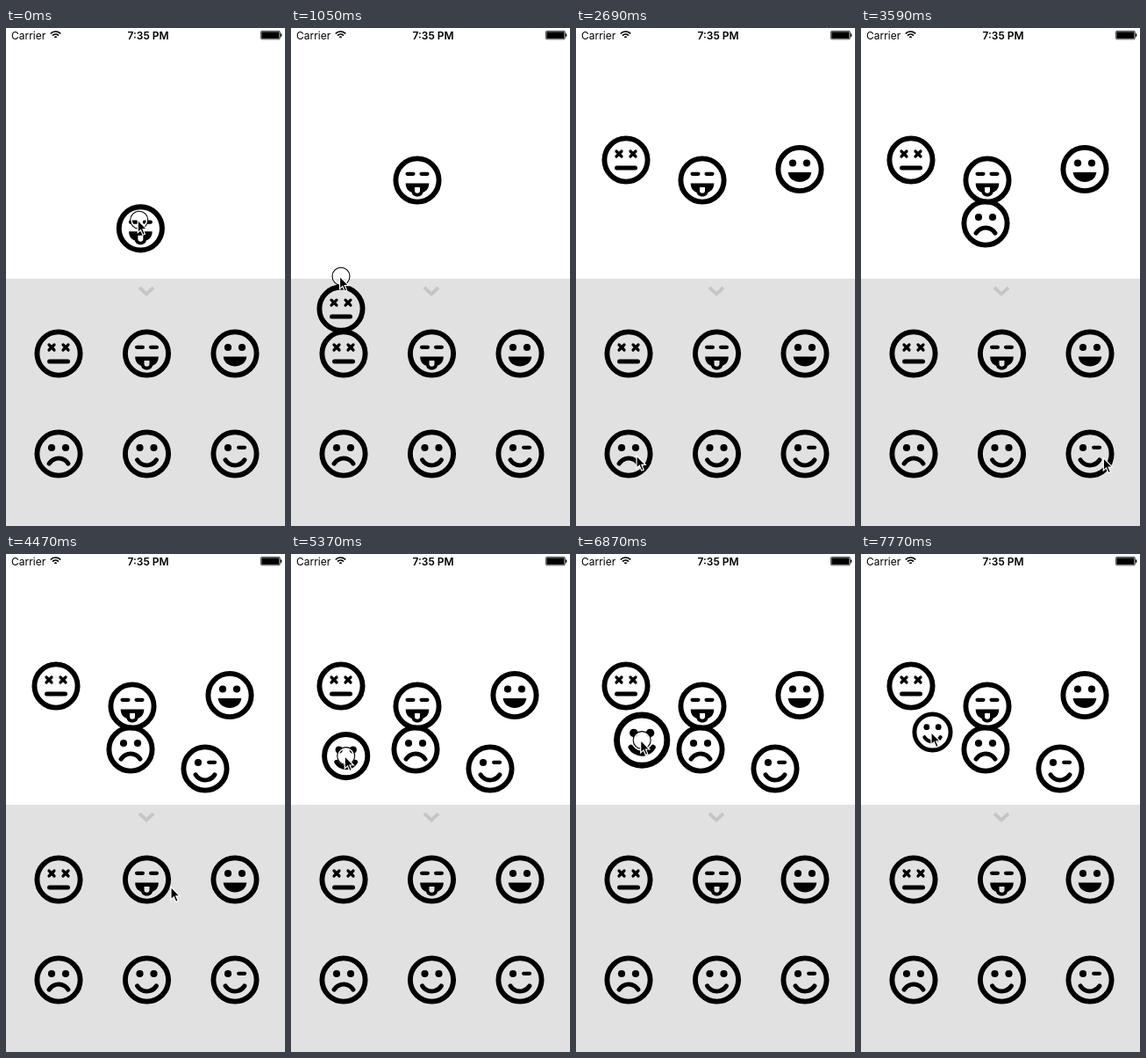
Recreate the animation shown at these times as an HTML page with a canvas. Size 318 px wide and 566 px high, loop 8000 ms.

```html
<!DOCTYPE html>
<html lang="en">
<head>
<meta charset="utf-8">
<title>Sticker tray</title>
<style>
html, body { margin: 0; width: 100%; height: 100%; overflow: hidden; background: #fff; }
canvas { display: block; width: 318px; height: 566px; }
</style>
</head>
<body>
<canvas id="stage"></canvas>
<script>
const W = 318, H = 566, LOOP = 8000, LAG = 60;
const canvas = document.getElementById('stage');
const ctx = canvas.getContext('2d');
const dpr = window.devicePixelRatio || 1;
canvas.width = W * dpr;
canvas.height = H * dpr;

// Each sticker is grabbed in the tray, pulled to its drop point, and left there.
const drags = [
  { name: 'tongue', grab: [178, 372], drop: [144, 173], start: -1140, end: 510 },
  { name: 'dead', grab: [57, 370], drop: [57, 150], start: 834, end: 1334 },
  { name: 'grin', grab: [261, 370], drop: [255, 160.5], start: 1750, end: 2100 },
  { name: 'sad', grab: [70.5, 486], drop: [142, 222], start: 2790, end: 3140 },
  { name: 'wink', grab: [278, 489], drop: [227, 244], start: 3700, end: 4200 },
  { name: 'smile', grab: [160, 484], drop: [62.7, 229.6], start: 4800, end: 5300 }
];
// The last sticker is held, grows while it moves, and shrinks on release.
const pinch = { press: 6270, start: 6595, grow: 6700, end: 7045, release: 7700, to: [81.5, 202.5] };

function ease(t, start, end) {
  const u = Math.min(1, Math.max(0, (t - start) / (end - start)));
  return u * u * (3 - 2 * u);
}

const mix = (a, b, p) => a.map((v, i) => v + (b[i] - v) * p);
const dragPoint = (d, t) => mix(d.grab, d.drop, ease(t, d.start, d.end));
const pinchPoint = t => mix(drags[5].drop, pinch.to, ease(t, pinch.start, pinch.end));

function pointerPoint(t) {
  const i = drags.findLastIndex(d => t >= d.start);
  const d = drags[i], next = drags[i + 1];
  if (t < d.end) return dragPoint(d, t);
  return next ? mix(d.drop, next.grab, ease(t, d.end, next.start - 100)) : pinchPoint(t);
}

const isPressed = t => drags.some(d => t >= d.start && t < d.end + 100) ||
  (t >= pinch.press && t < pinch.release);

function dot(x, y, r) {
  ctx.beginPath();
  ctx.arc(x, y, r, 0, Math.PI * 2);
  ctx.fill();
}

function line(width, ...pts) {
  ctx.lineWidth = width;
  ctx.beginPath();
  pts.forEach(p => ctx.lineTo(...p));
  ctx.stroke();
}

function arc(x, y, r, mid, half) {
  ctx.beginPath();
  ctx.arc(x, y, r, mid - half, mid + half);
  ctx.stroke();
}

const DOWN = Math.PI / 2, UP = -DOWN;

// Mouth arc whose middle lies at the given height.
function lips(y, mid) {
  const r = 12.8;
  ctx.lineWidth = 5;
  arc(0, y - r * Math.sin(mid), r, mid, 1.02);
}

const dotEye = x => dot(x, -7, 4.1);
const barEye = x => line(4.3, [x - 3.4, -7.2], [x + 3.4, -7.2]);
const crossEye = x => {
  line(3.2, [x - 3, -10], [x + 3, -4]);
  line(3.2, [x + 3, -10], [x - 3, -4]);
};
const pair = eye => [-8, 8].forEach(eye);

const faces = {
  dead() {
    pair(crossEye);
    line(5, [-10.5, 9], [10.5, 9]);
  },
  tongue() {
    pair(barEye);
    ctx.beginPath();
    ctx.moveTo(-13.3, 3.5);
    ctx.lineTo(13.3, 3.5);
    ctx.bezierCurveTo(13.3, 9, 10.5, 12.5, 6.5, 13.7);
    ctx.bezierCurveTo(5.5, 20, -5.5, 20, -6.5, 13.7);
    ctx.bezierCurveTo(-10.5, 12.5, -13.3, 9, -13.3, 3.5);
    ctx.roundRect(-3, 8, 6, 6.8, [0, 0, 3, 3]);
    ctx.fill('evenodd');
  },
  grin() {
    pair(dotEye);
    ctx.beginPath();
    ctx.moveTo(-13.3, 3.5);
    ctx.lineTo(13.3, 3.5);
    ctx.bezierCurveTo(12, 18, -12, 18, -13.3, 3.5);
    ctx.fill();
  },
  sad() {
    pair(dotEye);
    lips(5, UP);
  },
  smile() {
    pair(dotEye);
    lips(13, DOWN);
  },
  wink() {
    dotEye(-8);
    barEye(7.6);
    lips(13, DOWN);
  }
};

function drawFace(name, x, y, scale = 1) {
  ctx.save();
  ctx.translate(x, y);
  ctx.scale(scale, scale);
  ctx.fillStyle = ctx.strokeStyle = '#000';
  ctx.lineCap = 'round';
  ctx.lineWidth = 5.9;
  arc(0, 0, 24.6, 0, Math.PI);
  faces[name]();
  ctx.restore();
}

function drawStatus() {
  ctx.fillStyle = ctx.strokeStyle = '#000';
  ctx.textAlign = 'left';
  ctx.font = '12px Inter, "Liberation Sans", sans-serif';
  ctx.fillText('Carrier', 6, 12.5);
  ctx.textAlign = 'center';
  ctx.font = '600 12px Inter, "Liberation Sans", sans-serif';
  ctx.fillText('7:35 PM', 162, 12.5);

  ctx.lineCap = 'butt';
  ctx.lineWidth = 1.7;
  for (const r of [1.6, 4.7, 7.8]) arc(56.5, 11.8, r, UP, 0.82);

  ctx.lineWidth = 0.7;
  ctx.beginPath();
  ctx.roundRect(290.4, 3.4, 22, 9.4, 1.5);
  ctx.stroke();
  ctx.fillRect(291.3, 4.3, 20.2, 7.6);
  ctx.fillRect(313, 6.5, 1.3, 3.2);
}

function drawTray() {
  ctx.fillStyle = '#e1e1e1';
  ctx.fillRect(0, 285, W, H - 285);
  ctx.strokeStyle = '#c5c5c5';
  ctx.lineCap = 'butt';
  line(3.8, [152, 295], [160, 302.5], [168, 295]);
  Object.keys(faces).forEach((name, i) =>
    drawFace(name, 60 + 100.5 * (i % 3), i < 3 ? 370 : 484));
}

function drawStickers(t) {
  for (const d of drags) {
    if (t < d.start + LAG) continue;
    if (d.name === 'smile' && t >= pinch.press) {
      const scale = t < pinch.grow ? 1 : t < pinch.release ? 1.165 : 0.836;
      drawFace(d.name, ...pinchPoint(t), scale);
    } else {
      drawFace(d.name, ...dragPoint(d, t - LAG));
    }
  }
}

function drawPointer(x, y, pressed) {
  if (pressed) {
    ctx.strokeStyle = '#fff';
    ctx.lineWidth = 2;
    arc(x, y, 9, 0, Math.PI);
    ctx.strokeStyle = '#000';
    ctx.lineWidth = 1.1;
    arc(x, y, 10, 0, Math.PI);
  }
  ctx.save();
  ctx.translate(x - 1.5, y);
  ctx.beginPath();
  [[0, 0], [0, 14.3], [3.3, 11.3], [5.7, 17], [8.2, 16], [5.8, 10.4], [10.2, 10.4]]
    .forEach(p => ctx.lineTo(...p));
  ctx.closePath();
  ctx.fillStyle = '#000';
  ctx.strokeStyle = '#fff';
  ctx.lineWidth = 1.2;
  ctx.fill();
  ctx.stroke();
  ctx.restore();
}

// Motion advances in 150 ms ticks; the count restarts twice per loop.
function tick(t) {
  const base = [4470, 2240, 0].find(s => t >= s);
  return base + Math.floor((t - base) / 150) * 150;
}

function draw(t) {
  ctx.setTransform(dpr, 0, 0, dpr, 0, 0);
  ctx.fillStyle = '#fff';
  ctx.fillRect(0, 0, W, H);
  drawStatus();
  drawTray();
  drawStickers(t);
  drawPointer(...pointerPoint(t), isPressed(t));
}

const begin = performance.now();
function frame() {
  draw(tick((performance.now() - begin) % LOOP));
  requestAnimationFrame(frame);
}
frame();
</script>
</body>
</html>
```
